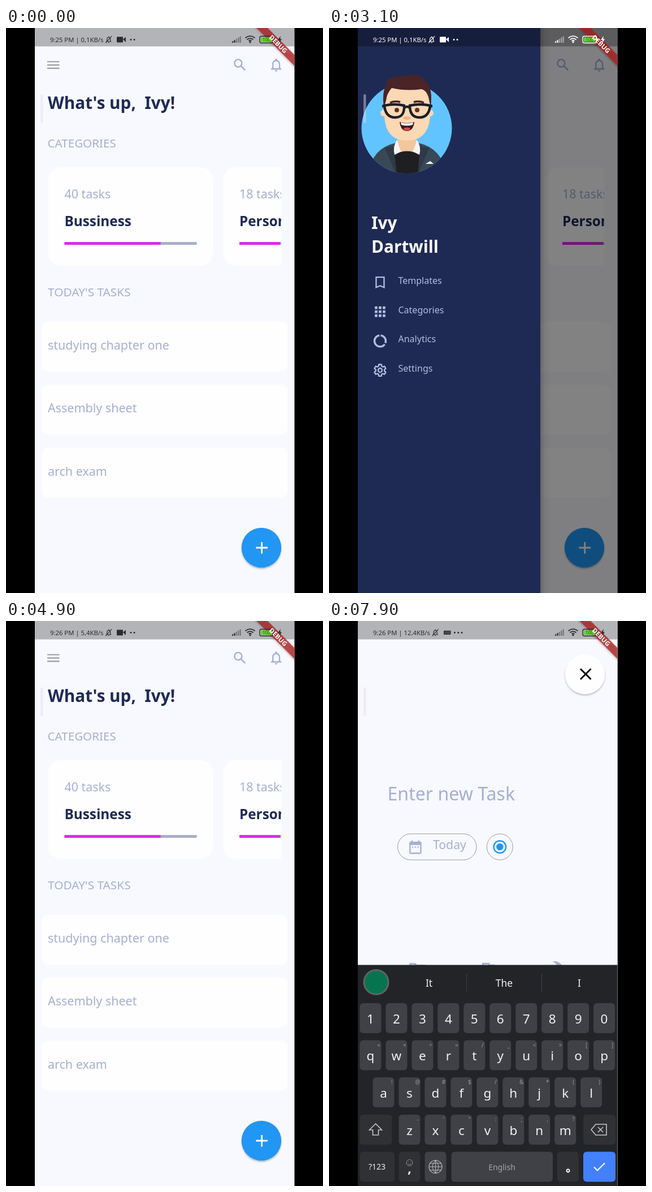
These frames come from a looping animation (561 by 998 pixels, 8 s). An HTML page:

```html
<!DOCTYPE html>
<html lang="en">
<head>
<meta charset="utf-8">
<title>Task app</title>
<style>
  html, body { margin: 0; width: 100%; height: 100%; overflow: hidden; background: #000; }
  svg { display: block; width: 561px; height: 998px; }
  text { font-family: "Noto Sans", "Open Sans", sans-serif; }
  .bold { font-weight: 700; }
</style>
</head>
<body>
<svg id="stage" viewBox="0 0 561 998"></svg>
<script>
const LOOP = 8000, STEP = 100;
const BG = '#f8f9ff', NAVY = '#1f2a54', MUTED = '#a6afd3', BLUE = '#2196f3', PINK = '#da2be6', PALE = '#b3bbdf';
const DRAWER_LEFT = 50, DRAWER_EDGE = 407;
const FIRST = 'Ivy', LAST = 'Dartwill';

// Markup helpers
const esc = s => s.replace(/&/g, '&amp;').replace(/</g, '&lt;');
const text = (s, x, y, size, fill, extra = '') =>
  `<text x="${x}" y="${y}" font-size="${size}" fill="${fill}" ${extra}>${esc(s)}</text>`;
const mid = (s, x, y, size, fill, extra = '') => text(s, x, y, size, fill, 'text-anchor="middle" ' + extra);
const rect = (x, y, w, h, r, fill, extra = '') =>
  `<rect x="${x}" y="${y}" width="${w}" height="${h}" rx="${r}" fill="${fill}" ${extra}/>`;
const circle = (x, y, r, fill, extra = '') => `<circle cx="${x}" cy="${y}" r="${r}" fill="${fill}" ${extra}/>`;
const line = (d, stroke, w, extra = '') => `<path d="${d}" fill="none" stroke="${stroke}" stroke-width="${w}" ${extra}/>`;
const group = (id, body, extra = '') => `<g id="${id}" ${extra}>${body}</g>`;
const icon = (x, y, scale, body) => `<g transform="translate(${x} ${y}) scale(${scale})">${body}</g>`;
const glyph = (d, fill) => `<path d="${d}" fill="${fill}"/>`;

const BELL = 'M12 22c1.1 0 2-.9 2-2h-4c0 1.1.9 2 2 2zm6-6v-5c0-3.07-1.63-5.64-4.5-6.32V4c0-.83-.67-1.5-1.5-1.5s-1.5.67-1.5 1.5v.68C7.64 5.36 6 7.92 6 11v5l-2 2v1h16v-1l-2-2zm-2 1H8v-6c0-2.48 1.51-4.5 4-4.5s4 2.02 4 4.5v6z';
const CALENDAR = 'M9 11H7v2h2zm4 0h-2v2h2zm4 0h-2v2h2zm2-7h-1V2h-2v2H8V2H6v2H5a2 2 0 0 0-2 2v14a2 2 0 0 0 2 2h14a2 2 0 0 0 2-2V6a2 2 0 0 0-2-2zm0 16H5V9h14z';
const FLAG = 'M12.36 6l.4 2H18v6h-3.36l-.4-2H7V6h5.36M14 4H5v17h2v-7h5.6l.4 2h7V6h-5.6z';
const MOON = 'M9 2c-1.05 0-2.05.16-3 .46 4.06 1.27 7 5.06 7 9.54s-2.94 8.27-7 9.54c.95.3 1.95.46 3 .46 5.52 0 10-4.48 10-10S14.52 2 9 2z';

function gearPath() {
  const pts = [];
  for (let a = 0; a < 360; a += 60)
    for (const [da, r] of [[-21, 6.6], [-12, 9], [12, 9], [21, 6.6]]) {
      const k = (a + da - 90) * Math.PI / 180;
      pts.push((12 + r * Math.cos(k)).toFixed(2) + ' ' + (12 + r * Math.sin(k)).toFixed(2));
    }
  return 'M' + pts.join('L') + 'z';
}

function home() {
  const card = (x, tasks, name, done) =>
    rect(x, 246, 291, 174, 22, '#fffeff') +
    text(tasks, x + 28.5, 301, 21.4, MUTED) +
    text(name, x + 28.5, 350, 24.3, NAVY, 'class="bold"') +
    rect(x + 28.5, 378, 234, 5, 0, '#a9aecb') + rect(x + 28.5, 378, done, 5, 0, PINK);
  const tasks = ['studying chapter one', 'Assembly sheet', 'arch exam'].map((s, i) =>
    rect(63, 519 + i * 111.3, 435, 88, 12, '#fffeff') + text(s, 74, 568 + i * 111.3, 21.5, MUTED));
  return rect(50, 0, 461, 998, 0, BG) +
    line('M73 59.5h21.5M73 65.3h21.5M73 71.2h21.5', '#9b9ba3', 2.2) +
    icon(399.5, 50.8, 1.2, circle(9.5, 9.5, 5.5, 'none', `stroke="${MUTED}" stroke-width="2"`) +
      line('M13.8 13.8L19.8 19.8', MUTED, 2.2)) +
    icon(464, 51, 1.18, glyph(BELL, MUTED)) +
    text(`What's up,\u00a0 ${FIRST}!`, 74, 143, 29.7, NAVY, 'class="bold"') +
    text('CATEGORIES', 73.5, 211, 20.6, MUTED) +
    `<g clip-path="url(#list)">${card(75, '40 tasks', 'Bussiness', 170)}${card(384.5, '18 tasks', 'Personal', 72)}</g>` +
    text("TODAY'S TASKS", 74, 474, 20.8, MUTED) + tasks.join('') +
    group('fab', circle(452, 918, 35.2, BLUE, 'filter="url(#lift)"') + line('M442.5 918h20.5M452.7 908v20.5', '#fff', 2.8));
}

function avatar() {
  const dark = '#1d1e23', skin = '#fcd8b4', hair = '#4a2426';
  return circle(137.5, 177, 80, '#62c4ff') +
    `<g clip-path="url(#face)">` +
    glyph('M70 260Q74 213 118 203H158Q202 213 207 260z', '#394856') +
    glyph('M118 208L99 212 119 260zM158 208L177 212 157 260z', '#2e3a47') +
    glyph('M122 180h32v42h-32z', '#f2c79d') +
    glyph('M116 223Q138 212 160 223L157 260H120z', '#1f1f22') +
    glyph('M121 197q-9 12-5 27 6-3 12-6-5-8-7-21zM155 197q9 12 5 27-6-3-12-6 5-8 7-21z', '#f6f5f5') +
    glyph('M171 240l8-5 6 5z', '#fff') + '</g>' +
    circle(97, 150, 6, skin) + circle(179, 150, 6, skin) +
    glyph('M98 118Q98 102 138 102T179 118V156Q176 199 138 199T98 156z', skin) +
    glyph('M97 141Q93 108 104 97L100 95Q110 84 130 86 152 78 168 89L166 92Q178 96 177 105 183 112 180 141L176 122Q172 110 164 108 136 112 111 106 102 116 101 128z', hair) +
    line('M108 132q9-4 18-1M150 131q9-3 18 1', hair, 3.5) +
    circle(120, 145, 4, '#5b3524') + circle(156, 145, 4, '#5b3524') +
    ['M98 137q18-4 35 0 1 21-16 21-17 0-19-21z', 'M143 137q18-4 36 0-2 21-19 21-17 0-17-21z']
      .map(d => line(d, dark, 4.4)).join('') +
    line('M133 141q5-4 10 0M94 138h6M177 138h6', dark, 4.4) +
    `<ellipse cx="138" cy="159" rx="7" ry="3" fill="#eeb48d"/>` +
    glyph('M125 166Q138 170 151 166 149 182 138 182T125 166z', '#3a1c1f') +
    glyph('M127 167Q138 170 149 167L148 171Q138 174 128 171z', '#fff') +
    `<ellipse cx="138" cy="178.5" rx="6" ry="2.8" fill="#dc4a50"/>`;
}

function drawer() {
  const grid = [4, 10, 16].map(x => [4, 10, 16].map(y => rect(x, y, 4, 4, 0, PALE)).join('')).join('');
  const items = [
    ['Templates', line('M6 4h12v15.5l-6-2.6-6 2.6z', PALE, 2)],
    ['Categories', grid],
    ['Analytics', circle(12, 12, 8.5, 'none', `stroke="${PALE}" stroke-width="3" pathLength="100" stroke-dasharray="29 4 63 4" stroke-dashoffset="23"`)],
    ['Settings', line(gearPath(), PALE, 2, 'stroke-linejoin="round"') + circle(12, 12, 3, 'none', `stroke="${PALE}" stroke-width="2"`)]
  ].map(([label, art], i) =>
    icon(109.4, 248.4 + i * 51.7, 1.17, art) + text(label, 155.5, 264.8 + i * 51.7, 16, PALE));
  return rect(DRAWER_EDGE, 0, 18, 998, 0, 'url(#shade)') + rect(50, 0, DRAWER_EDGE - 50, 998, 0, NAVY) +
    group('photo', avatar(), 'transform="translate(33 0)"') +
    group('menu', text(FIRST, 108, 168, 29.7, '#fff', 'class="bold"') +
      text(LAST, 108, 210, 29.7, '#fff', 'class="bold"') + items.join(''));
}

function taskForm() {
  const pill = 'stroke="#999" stroke-width="1"';
  return text('Enter new Task', 103.5, 317, 32.1, MUTED) +
    rect(121.5, 376, 139.5, 46, 23, 'none', pill) + icon(138.5, 385, 1.2, glyph(CALENDAR, MUTED)) +
    text('Today', 184, 402.5, 21.2, MUTED) +
    circle(302.3, 399, 23, 'none', pill) +
    circle(302.3, 399, 10.8, 'none', `stroke="${BLUE}" stroke-width="2.4"`) + circle(302.3, 399, 6.2, BLUE) +
    icon(139.2, 598.3, 1.46, line('M3 19V5h6l2 2h10v12zM12 13.5h7M15.5 10v7', MUTED, 2)) +
    icon(263.7, 598, 1.46, glyph(FLAG, MUTED)) + icon(386.3, 598, 1.46, glyph(MOON, MUTED)) +
    rect(269, 868, 199, 59, 29.5, '#448aff', 'filter="url(#glow)"') +
    text('New task', 308.5, 899, 14.6, '#fff', 'font-weight="500"') + line('M403 902l8-8 8 8', '#fff', 2.8);
}

const closeButton = () => circle(453, 94, 35.2, '#fffeff', 'filter="url(#lift)"') +
  line('M445 84.5l18.5 18.5M463.5 84.5l-18.5 18.5', '#000', 2.8);

function keyboard() {
  const KEY = '#404146', SIDE = '#303135', INK = '#f1f1f3', HINT = '#96979b';
  const row = (chars, hints, x, y) => [...chars].map((c, i) => {
    const left = x + i * 45.95;
    return rect(left, y, 38, 53, 6, KEY) + mid(c, left + 19, y + 35.5, 22.5, INK, 'font-weight="500"') +
      (hints ? mid(hints[i], left + 33.5, y + 12, 10, HINT) : '');
  }).join('');
  const wide = (x, y, w, fill) => rect(x, y, w, 53, 6, fill);
  const words = ['It', 'The', 'I'].map((s, i) => mid(s, 177 + i * 133, 646, 17.5, INK)).join('');
  return rect(50, 607.5, 461, 391, 0, '#232428') +
    circle(83.5, 638, 21.5, '#08744f', 'stroke="#5e6563" stroke-width="3"') +
    group('words', words + line('M243.5 623v31M376.5 623v31', '#404146', 1)) +
    row('1234567890', '', 54.5, 675) + row('qwertyuiop', '+×÷=/_<>[]', 54.5, 740.5) +
    row('asdfghjkl', '!@#$/&*()', 77.5, 806) + row('zxcvbnm', '-\'":;,?', 123.5, 872) +
    wide(54.5, 872, 57, SIDE) + line('M82.5 888l-11 11h6v9h10v-9h6z', '#c4c5c8', 1.6) +
    wide(450, 872, 57, SIDE) + line('M472 889h19v19h-19l-8-9.5zM476 894l9 9M485 894l-9 9', '#c4c5c8', 1.6) +
    wide(54.5, 937.5, 61.5, SIDE) + mid('?123', 85, 969, 14, INK, 'font-weight="500"') +
    wide(123.5, 937.5, 38, SIDE) + circle(142.5, 957, 5.5, 'none', `stroke="${HINT}"`) +
    line('M139.5 958.5q3 3.5 6 0M140.5 955v1M144.5 955v1', HINT, 1) + mid(',', 142.5, 975, 23, INK, 'class="bold"') +
    wide(169.5, 937.5, 38, KEY) + circle(188.5, 964, 11.5, 'none', 'stroke="#b9babd" stroke-width="1.2"') +
    line('M177 964h23M188.5 952.5v23M179 958h19M179 970h19M188.5 952.5q-11 11.5 0 23 11-11.5 0-23', '#b9babd', 1) +
    wide(216.5, 937.5, 179.5, KEY) + mid('English', 306, 969.5, 14, '#a3a4a8') +
    wide(404, 937.5, 38, SIDE) + circle(423, 971, 2.4, 'none', `stroke="${INK}" stroke-width="2"`) +
    wide(450, 937.5, 57, '#4281fb') + line('M469 964.5l6 6 13-13', '#fff', 2.2);
}

function statusBar() {
  const bars = [0, 1, 2, 3, 4].map(i =>
    rect(400 + i * 3.4, 23.5 - i * 2.2, 2.2, 2.5 + i * 2.2, 0, 'currentColor', i > 1 ? 'opacity=".45"' : '')).join('');
  const wifi = [[2.5, 23], [5.5, 20.5], [8.5, 17.5]].map(([w, y]) =>
    line(`M${432 - w} ${y}Q432 ${y - w * .8} ${432 + w} ${y}`, 'currentColor', 1.7)).join('');
  return `<text id="clock" x="78" y="24.5" font-size="11.3" fill="currentColor"></text>` +
    group('mute', icon(174.5, 13.2, .6, glyph(BELL, 'currentColor') + line('M3 22L21 2', 'currentColor', 2))) +
    group('camera', rect(196, 15.5, 11, 10, 1, 'currentColor') + glyph('M207 20l5-4v9z', 'currentColor') +
      circle(221, 20.5, 1.5, 'currentColor') + circle(227, 20.5, 1.5, 'currentColor')) +
    group('typing', rect(203, 17, 12.5, 7, 1, 'currentColor') +
      line('M205 19h9M205 21.5h9', '#b5b6bb', 1, 'stroke-dasharray="1 1"') +
      [222.5, 228.8, 235].map(x => circle(x, 20.5, 1.5, 'currentColor')).join('')) +
    bars + wifi + circle(432, 25, 1.6, 'currentColor') +
    rect(449, 14.5, 24, 12, 3, 'none', 'stroke="currentColor" stroke-width="1.4"') +
    rect(473.5, 18, 2, 5, 1, 'currentColor') + rect(451, 16.5, 20, 8, 1.5, '#62d22c') +
    mid('100', 461, 23.6, 8, '#2f6d1a') + glyph('M486 14l-5 7h3l-1 6 5-7.5h-3z', 'currentColor');
}

const corner = body => `<g transform="translate(510 0) rotate(45)">${body}</g>`;

const shadow = (id, dy, blur, color, alpha) =>
  `<filter id="${id}" x="-30%" y="-30%" width="160%" height="170%"><feDropShadow dx="0" dy="${dy}" stdDeviation="${blur}" flood-color="${color}" flood-opacity="${alpha}"/></filter>`;

document.getElementById('stage').innerHTML = '<defs>' +
  shadow('lift', 2, 1.6, '#000', .28) + shadow('glow', 4, 3.5, '#2a62c4', .6) +
  `<linearGradient id="shade"><stop offset="0" stop-opacity=".2"/><stop offset=".4" stop-opacity=".06"/><stop offset="1" stop-opacity="0"/></linearGradient>
  <clipPath id="list"><rect x="74" y="240" width="413" height="190"/></clipPath>
  <clipPath id="face"><circle cx="137.5" cy="177" r="80"/></clipPath>
  <clipPath id="screen"><rect x="51" width="459.5" height="998"/></clipPath></defs>` +
  rect(0, 0, 561, 998, 0, '#000') +
  '<g clip-path="url(#screen)">' + home() + group('scrim', rect(50, 0, 461, 998, 0, '#000')) +
  group('drawer', drawer()) +
  group('page', rect(50, 0, 461, 998, 0, BG) + group('form', taskForm())) +
  group('close', closeButton()) + group('keys', keyboard()) +
  rect(50, 0, 461, 32.5, 0, '#000', 'opacity=".28"') +
  corner(rect(-80, 33, 160, 14, 0, '#ab1c1c', 'fill-opacity=".75" filter="url(#lift)"')) +
  group('status', statusBar()) +
  corner(mid('DEBUG', 0, 44.2, 11.5, '#fff', 'font-weight="800"')) +
  rect(61, 117, 4.6, 51, 2, '#e1e1e4', 'opacity=".45"') + '</g>';

// Motion
const el = {};
document.querySelectorAll('[id]').forEach(n => el[n.id] = n);
const clamp = v => Math.min(1, Math.max(0, v));
const easeOut = (p, power) => 1 - Math.pow(1 - p, power);
const move = (n, x, y) => n.setAttribute('transform', `translate(${x.toFixed(2)} ${y.toFixed(2)})`);
const show = (n, on) => n.setAttribute('display', on ? 'inline' : 'none');

const DRAG = [[3000, 407], [3100, 374], [3500, 182], [3700, 70], [3800, 55], [3900, 50]];

function drawerEdge(t) {
  if (t < 1680 || t >= 3900) return DRAWER_LEFT;
  if (t < 3000) {
    // critically damped spring
    const k = (t - 1680) * .02236;
    return DRAWER_LEFT + (DRAWER_EDGE - DRAWER_LEFT) * (1 - (1 + k) * Math.exp(-k));
  }
  const i = DRAG.findIndex(p => p[0] > t);
  const [t0, x0] = DRAG[i - 1], [t1, x1] = DRAG[i];
  return x0 + (x1 - x0) * (t - t0) / (t1 - t0);
}

// Status icons turn white over the open drawer, then dark again
function statusColor(t) {
  const white = clamp((t - 2000) / 300) - clamp((t - 3500) / 300);
  const v = Math.round(44 + 211 * white);
  return `rgb(${v},${v},${v})`;
}

function draw(t) {
  const edge = drawerEdge(t), loaded = t >= 2100;
  show(el.drawer, edge > DRAWER_LEFT);
  move(el.drawer, edge - DRAWER_EDGE, 0);
  el.scrim.setAttribute('opacity', .54 * (edge - DRAWER_LEFT) / (DRAWER_EDGE - DRAWER_LEFT));
  show(el.photo, loaded);
  move(el.menu, 0, loaded ? 187 : 0);

  const fly = clamp((t - 5400) / 200), open = clamp((t - 5600) / 300);
  show(el.fab, fly === 0);
  show(el.close, fly > 0);
  move(el.close, 0, 824 * (1 - easeOut(fly, 6)));
  show(el.page, open > 0);
  el.page.setAttribute('opacity', open * open);
  move(el.form, 0, 250 * (1 - easeOut(open, 3)));

  const rise = clamp((t - 7150) / 400), typing = t >= 7400;
  show(el.keys, rise > 0);
  move(el.keys, 0, 391 * (1 - easeOut(rise, 3)));
  show(el.words, t >= 7600);

  const speed = typing ? '12,4' : t >= 3300 ? '5,4' : '0,1';
  el.clock.textContent = `9:${t >= 3600 ? 26 : 25} PM | ${speed}KB/s`;
  el.status.setAttribute('color', statusColor(t));
  move(el.mute, typing ? 6.5 : 0, 0);
  show(el.camera, !typing);
  show(el.typing, typing);
}

const start = performance.now();
function tick() {
  const t = (performance.now() - start) % LOOP;
  draw(Math.floor(t / STEP) * STEP);
  requestAnimationFrame(tick);
}
tick();
</script>
</body>
</html>
```
